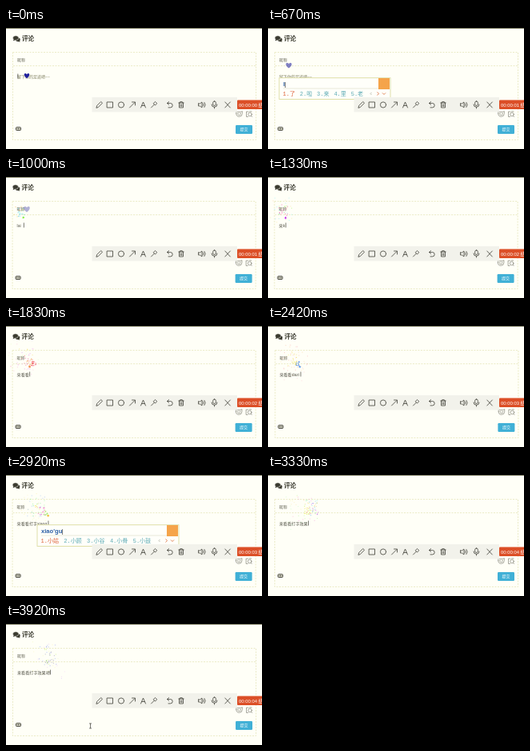
These frames come from a looping animation (320 by 152 pixels, 4010 ms). An HTML page with a canvas:

```html
<!DOCTYPE html>
<html lang="zh-CN">
<head>
<meta charset="utf-8">
<title>评论</title>
<style>
html, body { margin: 0; width: 100%; height: 100%; overflow: hidden; background: #fffff7; }
svg, canvas { position: absolute; left: 0; top: 0; width: 320px; height: 152px; }
text { font-family: "Liberation Sans", "Noto Sans CJK SC", sans-serif; white-space: pre; }
#picks text { font-family: "Liberation Mono", "Noto Sans CJK SC", monospace; }
.dash { fill: none; stroke: #e6e6bc; stroke-width: .8; stroke-dasharray: 2 1.5; }
.icon { fill: none; stroke: #4a4a42; stroke-width: .85; stroke-linecap: round; stroke-linejoin: round; }
</style>
</head>
<body>
<svg viewBox="0 0 320 152">
  <path d="M0 .5H320" stroke="#85856a"/>
  <g id="page">
    <g fill="#3b3b30">
      <ellipse cx="14.800" cy="14.600" rx="2.900" ry="2.400"/>
      <path d="M14.500 16.900q2.200 .2 3 .7l-.5-2z"/>
      <ellipse cx="12.200" cy="12.500" rx="3.600" ry="2.800" stroke="#fffff7" stroke-width=".5"/>
      <path d="M9.900 13.800L9 16.300L12.500 14.800z"/>
      <text x="20" y="16" font-size="7.600" font-weight="700">评论</text>
    </g>
    <rect class="dash" x="8.500" y="30.500" width="304" height="110"/>
    <path class="dash" d="M9 47.500H312"/>
    <text x="14" y="42" font-size="5" fill="#68685a">昵称</text>
    <text id="hint" x="14" y="62.500" font-size="5" fill="#808062">留下你的足迹吧~~</text>
    <text id="typed" x="14" y="62.500" font-size="5.100" fill="#55554a"></text>
    <rect id="caret" y="57.500" width=".7" height="6" fill="#44443c"/>
    <rect x="12.500" y="124.700" width="6" height="3.800" rx=".8" fill="#d9d9c8" stroke="#37372f" stroke-width=".9"/>
    <path d="M13.800 126.600h3.500" stroke="#37372f" stroke-width="1" stroke-dasharray=".8 .5"/>
    <g class="icon" style="stroke:#85857a;stroke-width:.7">
      <path d="M287.800 107.500V104.500l2 1h3.500l2-1v3q0 3.800-3.800 3.800t-3.700-3.800M289.500 107.300h1M292.500 107.300h1M289.800 109q1.700 1.300 3.400 0"/>
      <path d="M303 105h-2.500v6.500h2M307.500 111.500l-1-1.200M304.500 104.800h2.500"/>
      <circle cx="305" cy="108.500" r="2.300"/>
    </g>
    <rect x="287" y="122" width="21" height="11" rx="1.200" fill="#40b0d6"/>
    <text x="297.500" y="129.400" font-size="5" fill="#fff" text-anchor="middle">提交</text>
  </g>
</svg>
<canvas id="fx"></canvas>
<svg viewBox="0 0 320 152">
  <g id="ime">
    <rect id="panel" x="0" y="62.700" height="26.800" fill="#fffffa" stroke="#dcdca0" stroke-width=".9"/>
    <path id="rule" stroke="#e0e0cc" stroke-width=".7"/>
    <text x="5" y="72.800" font-size="7.600" font-weight="700" fill="#2c5fa6"><tspan id="pinyin"></tspan><tspan font-weight="400" fill="#333" dx="-.6">|</tspan></text>
    <g id="picks" font-size="7"></g>
    <g id="tail">
      <rect x="-15" y="63" width="14" height="14" fill="#f5a44a"/>
      <path d="M-23.500 81l-1.500 1.500l1.500 1.500" fill="none" stroke="#b0b0a2" stroke-width=".8"/>
      <path d="M-16.500 80.500l2 2l-2 2M-10 81.500l2 2l2-2" fill="none" stroke="#dd7a48" stroke-width=".9"/>
    </g>
  </g>
  <rect x="107.500" y="87" width="181.500" height="18.500" fill="#f2f2eb"/>
  <g class="icon">
    <path d="M113 100l.7-2.500l5-5l1.800 1.800l-5 5z"/>
    <rect x="126.500" y="93" width="7" height="7"/>
    <circle cx="144" cy="96.500" r="3.600"/>
    <path d="M154.500 100l6.500-6.500M157.500 93h4v4"/>
    <path d="M168.500 100l3-7l3 7M169.700 97.500h3.600"/>
    <path d="M181.500 100l4-4M184.500 94.500l2-2l2.300 2.300l-2 2z"/>
    <path d="M203.500 92.500l-2 2l2 2M201.500 94.500h4a2.700 2.700 0 0 1 0 5.400h-2.500"/>
    <path d="M215.800 94h6.400M217.700 94v-1.300h2.600V94M216.500 94v6h5v-6M218.200 96v2.500M219.800 96v2.500"/>
    <path d="M240.500 95v3h2l2.500 2v-7l-2.500 2zM246.500 95q1.500 1.500 0 3M248 93.500q2.500 3 0 6"/>
    <rect x="258.700" y="92" width="3.600" height="5.500" rx="1.800"/>
    <path d="M257 96q0 3.300 3.500 3.300T264 96M260.500 99.300v1.700"/>
    <path d="M273.800 93l6.500 7M280.300 93l-6.500 7"/>
  </g>
  <rect x="289" y="90.500" width="32" height="11.500" rx="1" fill="#dc4f27"/>
  <text id="clock" x="291" y="98.700" font-size="5.900" fill="#fff"></text>
  <path id="mouse" d="M-1.500-3H1.500M0-3V3M-1.500 3H1.500" fill="none" stroke="#55554c" stroke-width=".8"/>
</svg>
<script>
const LOOP = 4010, FPS = 12, SCALE = .37;
const $ = id => document.getElementById(id);
const show = (el, on) => el.style.display = on ? '' : 'none';

// step, committed text, inline pinyin, panel pinyin, spark hue
const typing = [
  [0, '', '', ''],
  [8, '', '', 'l'],
  [9, '', 'l', 'la', 40],
  [10, '', 'la', 'lai', 190],
  [12, '', 'lai', '', 90],
  [13, '来', '', '', 330],
  [16, '来', 'k', '', 290],
  [17, '来', 'ka', 'kan', 50],
  [19, '来', 'kan', "kan'k", 340],
  [20, '来', 'kank', "kan'kan", 30],
  [21, '来', 'kankan', '', 350],
  [22, '来看看', '', '', 25],
  [25, '来看看', 'd', 'da', 55],
  [27, '来看看', 'da', "da'z", 55],
  [28, '来看看', 'daz', "da'zi", 220],
  [29, '来看看', 'dazi', '', 215],
  [30, '来看看打字', '', '', 130],
  [32, '来看看打字', 'x', 'xi', 50],
  [33, '来看看打字', 'xi', 'xiao', 320],
  [34, '来看看打字', 'xiao', "xiao'g", 100],
  [35, '来看看打字', 'xiaog', "xiao'gu", 45],
  [36, '来看看打字', 'xiaogu', "xiao'guo", 200],
  [37, '来看看打字', 'xiaoguo', '', 280],
  [38, '来看看打字效果', '', '', 60],
  [41, '来看看打字效果', 'b', 'ba', 230],
  [43, '来看看打字效果', 'ba', '', 90],
  [44, '来看看打字效果吧', '', '', 240]
];
const choices = {
  l: '了 啦 来 里 老', la: '啦 拉 辣 蜡 喇', lai: '来 莱 赖 睐 籁',
  kan: '看 砍 侃 刊 堪', "kan'k": '看看 看开 看客 坎坷 看课', "kan'kan": '看看 侃侃 砍砍 看刊 坎坎',
  da: '大 打 达 答 搭', "da'z": '打字 大字 打折 大众 大战', "da'zi": '打字 大字 搭子 达子 大子',
  xi: '系 西 洗 细 喜', xiao: '小 笑 校 效 消', "xiao'g": '效果 小哥 小狗 小鬼 小个',
  "xiao'gu": '小姑 小顾 小谷 小骨 小鼓', "xiao'guo": '效果 小锅 小果 小郭 小过', ba: '吧 把 爸 八 罢'
};

function seeded(s) {
  return () => {
    s = (s * 16807 + 11) % 2147483647;
    return s / 2147483647;
  };
}

const caretX = (text, pin) => 14.5 + text.length * 5.1 + pin.length * 2.6;
const bursts = typing.filter(e => e[4] !== undefined).map(([step, text, pin, , hue]) => {
  const rnd = seeded(step * 7919 + 101);
  rnd();
  const bits = Array.from({ length: 8 + Math.floor(rnd() * 9) }, () => ({
    vx: (rnd() * 2 - 1) * 60 * SCALE,
    vy: -(1 + rnd() * 2.5) * 60 * SCALE,
    color: `hsl(${hue + rnd() * 20 - 10}, ${step === 44 ? 15 : 85}%, ${58 + rnd() * 10}%)`
  }));
  return { at: step / FPS, x: caretX(text, pin) - 1, bits, kick: rnd() < .5 ? -.4 : .4, step };
});

const fx = $('fx'), ratio = window.devicePixelRatio || 1;
fx.width = 320 * ratio;
fx.height = 152 * ratio;
const ctx = fx.getContext('2d');
ctx.scale(ratio, ratio);

function drawHeart(t) {
  const alpha = 1 - .65 * t, size = .9 + .15 * t;
  if (alpha <= 0 || t > 1.25) return;
  ctx.save();
  ctx.globalAlpha = alpha;
  ctx.translate(26, 60 - 19.6 * t);
  ctx.scale(size, size);
  ctx.fillStyle = '#20209c';
  ctx.beginPath();
  ctx.moveTo(0, 3.6);
  ctx.bezierCurveTo(-6.5, -1, -2.8, -5.4, 0, -2);
  ctx.bezierCurveTo(2.8, -5.4, 6.5, -1, 0, 3.6);
  ctx.fill();
  ctx.restore();
}

function drawSparks(t) {
  for (const b of bursts) {
    const age = t - b.at + .03;
    if (age < 0 || age > .94) continue;
    ctx.globalAlpha = Math.exp(-2.1 * age);
    for (const p of b.bits) {
      ctx.fillStyle = p.color;
      ctx.fillRect(b.x + p.vx * age, 52 + p.vy * age + 50 * age * age, 1.1, 1.1);
    }
  }
  ctx.globalAlpha = 1;
}

let panelKey = null;
function setPanel(text, pin) {
  const key = text + pin;
  if (key === panelKey) return;
  panelKey = key;
  show($('ime'), pin);
  if (!pin) return;
  const words = choices[pin].split(' '), n = words[0].length, width = 101 + 38 * n;
  $('ime').setAttribute('transform', `translate(${14 + 5 * text.length} 0)`);
  $('panel').setAttribute('width', width);
  $('rule').setAttribute('d', `M5 76H${width - 5}`);
  $('tail').setAttribute('transform', `translate(${width} 0)`);
  $('pinyin').textContent = pin;
  $('picks').innerHTML = words.map((w, i) =>
    `<text x="${4.5 + i * (13.8 + 7.5 * n)}" y="84.800" fill="${i ? '#5aa9b4' : '#dd5f38'}">${i + 1}.${w}</text>`).join('');
}

function render(ms) {
  const step = Math.min(47, Math.floor((ms + 5) * FPS / 1000)), t = step / FPS;
  const [, text, pin, panel] = typing.filter(e => e[0] <= step).pop();
  const x = caretX(text, pin);
  show($('hint'), !(text + pin));
  $('typed').textContent = text + pin;
  $('caret').setAttribute('x', x);
  show($('caret'), pin || text || step < 6);
  setPanel(text, panel);

  const hit = bursts.find(b => b.step === step);
  $('page').setAttribute('transform', `translate(${hit ? hit.kick : 0} 0)`);
  $('clock').textContent = `00:00:0${Math.floor(t + .8)} 结束`;

  const move = Math.min(1, (step - 43) / 4);
  show($('mouse'), move > 0);
  $('mouse').setAttribute('transform', `translate(${26 + 79.5 * move} ${62 + 66 * move})`);

  ctx.clearRect(0, 0, 320, 152);
  drawHeart(t);
  drawSparks(t);
}

const start = performance.now();
function tick() {
  render((performance.now() - start) % LOOP);
  requestAnimationFrame(tick);
}
tick();
</script>
</body>
</html>
```
